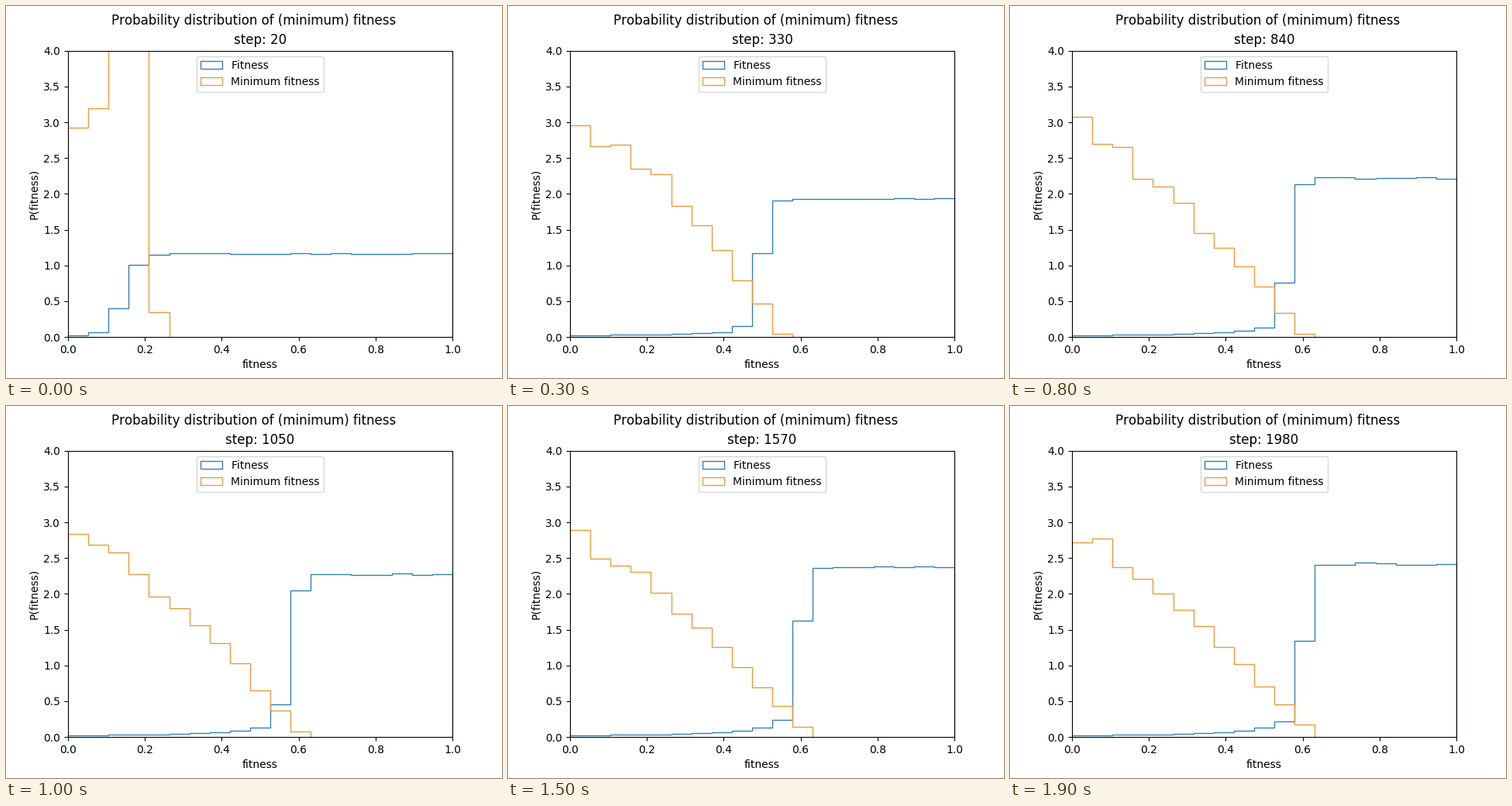
A matplotlib script that plays this animation: 640 px wide and 480 px high, repeating every 2000 ms.

```python
import numpy as np
import matplotlib.pyplot as plt
from matplotlib.animation import FuncAnimation

BINS, FRAMES, INTERVAL = 19, 20, 100
BLUE, ORANGE = "#3180b6", "#ec9a38"
CRITICAL = 2 / 3

plt.rcParams["text.kerning_factor"] = 6

edges = np.linspace(0, 1, BINS + 1)
x = (np.arange(BINS * 40) + 0.5) / (BINS * 40)


def step_at(k):
    return (6 + 31 * k) // 3 * 10


def gap_at(k):
    """Distance of the threshold from its critical value: a power law."""
    return 6.87 * (step_at(k) + 43) ** -0.6232


def binned(density):
    return density.reshape(BINS, -1).mean(axis=1)


def fitness(k):
    """Thin tail below a soft threshold, flat plateau above it."""
    gap = gap_at(k)
    width = 0.024 * gap ** 0.4
    cover = 1 / (1 + np.exp(-(x - CRITICAL + gap) / width))
    tail = 0.0137 * np.maximum(CRITICAL - x, 0.05) ** -1.25 * (1 - cover)
    plateau = (1 - tail.mean()) / cover.mean()
    noise = np.random.default_rng(k).normal(0, 0.004, BINS)
    return binned(tail + plateau * cover) * (1 + noise)


def minimum(k):
    """Slope down to just past the threshold, with an early bump there."""
    gap = gap_at(k)
    pos = CRITICAL - gap
    end = pos + 0.11 * gap ** 0.45
    slope = np.clip(1 - (x / end) ** (1.15 + 20 * gap ** 2), 0, None)
    bump = 29 * gap ** 4 * np.exp(-((x - pos - 0.01) / 0.035) ** 2)
    density = slope + bump
    noise = np.random.default_rng(100 + k).normal(0, 0.03, BINS)
    return binned(density / density.mean()) * (1 + noise)


def outline(h):
    """Step outline that stops after the last bin of visible height."""
    n = np.flatnonzero(h > 0.005)[-1] + 1
    return np.column_stack([np.repeat(edges[:n + 1], 2),
                            np.r_[0, np.repeat(h[:n], 2), 0]])


fig, ax = plt.subplots(figsize=(6.4, 4.8), dpi=100)
fig.suptitle("Probability distribution of (minimum) fitness")
title = ax.set_title("")


def add_hist(rule, color, label):
    return ax.fill(*outline(rule(0)).T, fill=False, closed=False,
                   edgecolor=color, linewidth=1, label=label)[0]


fit_line = add_hist(fitness, BLUE, "Fitness")
min_line = add_hist(minimum, ORANGE, "Minimum fitness")
ax.set(xlim=(0, 1), ylim=(0, 4), xlabel="fitness", ylabel="P(fitness)")
ax.legend(loc="upper center")


def update(k):
    fit_line.set_xy(outline(fitness(k)))
    min_line.set_xy(outline(minimum(k)))
    title.set_text(f"step: {step_at(k)}")
    return fit_line, min_line, title


anim = FuncAnimation(fig, update, frames=FRAMES, interval=INTERVAL,
                     repeat=True, repeat_delay=0, blit=False)
plt.show()
```
